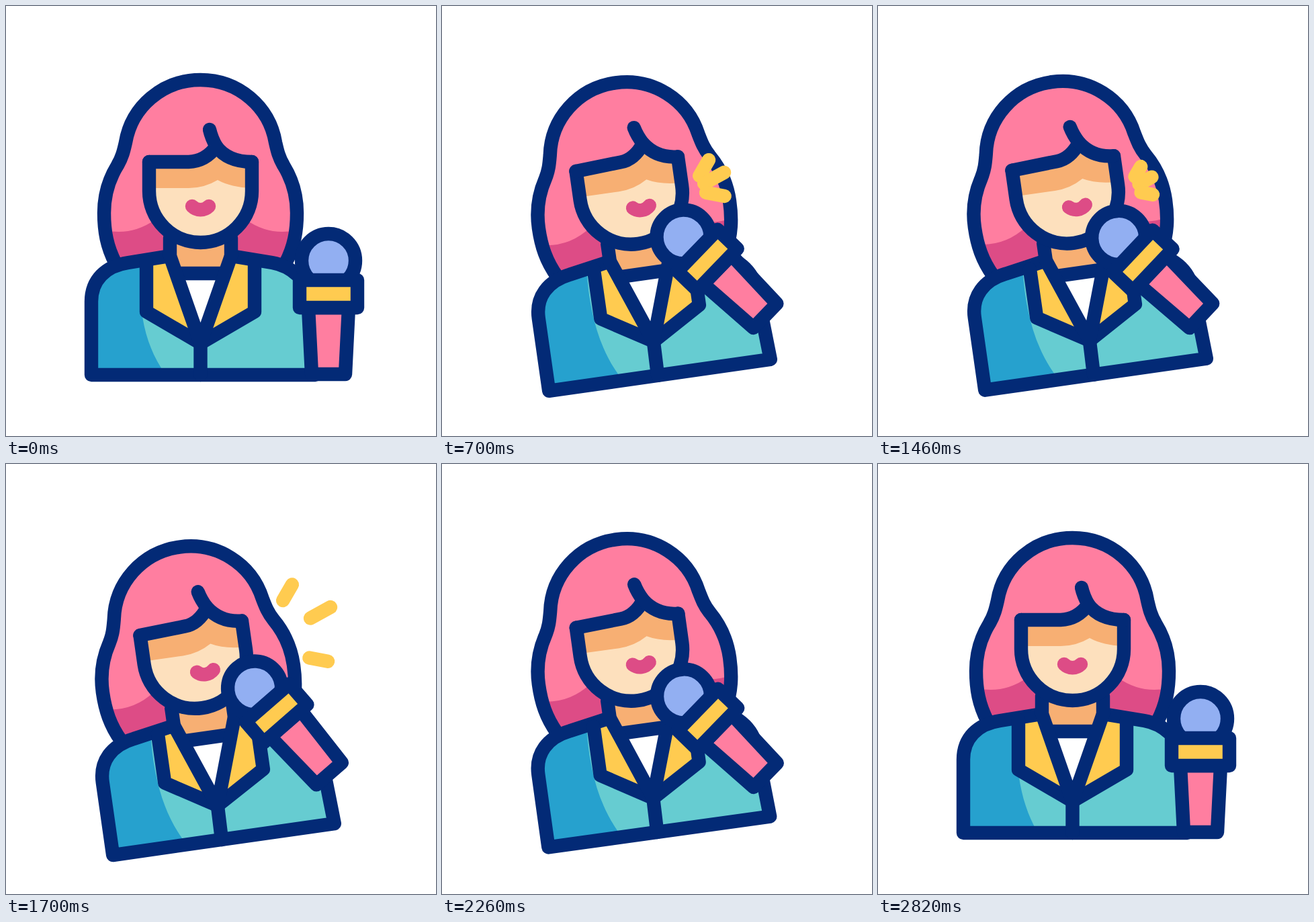
Animation, 640 px wide and 640 px high, one loop 3.02 s. Source, as an HTML page:

```html
<!DOCTYPE html>
<html lang="en">
<head>
<meta charset="utf-8">
<title>Singer</title>
<style>
  html, body { margin: 0; height: 100%; overflow: hidden; background: #fff; }
  svg { display: block; width: 100vw; height: 100vh; }
</style>
</head>
<body>
<svg id="stage" viewBox="0 0 640 640" fill="none" stroke-width="20.4" stroke-linecap="round" stroke-linejoin="round"></svg>
<script>
const LOOP = 3020, TALK = 600, BOB = 800, BACK = 2200, REST = 2810;
const NAVY = '#032a76', PINK = '#ff7ea0', ROSE = '#dd4c86', SKIN = '#fde0bd', TAN = '#f7af73',
      BLUE = '#26a1ce', TEAL = '#66ccd1', GOLD = '#ffcb50', LILAC = '#92aff2';

const stage = document.getElementById('stage');
const clamp = x => Math.min(1, Math.max(0, x));
const ease = x => (1 - Math.cos(Math.PI * clamp(x))) / 2;
const fill = (d, color) => `<path d="${d}" fill="${color}"/>`;
const line = (d, color = NAVY) => `<path d="${d}" stroke="${color}"/>`;
const lift = (dy, shapes) => `<g transform="translate(0 ${-dy})">${shapes}</g>`;

const HAIR = 'M163 383C150 358 146 335 146 308C146 280 153 258 166 237C173 225 175 216 178 203' +
  'C187 150 233 110 289.5 110C346 110 392 150 401 203C404 216 406 225 413 237' +
  'C426 258 433 280 433 308C433 335 429 358 416 383';
const LEFT_ARM = 'M127 549V440C127 408 148 387 182 382';
const RIGHT_ARM = 'L396 382C424 387 450 408 454 440L460 549';
const FACE = 'M213 232V275.5A76.5 76.5 0 0 0 366 275.5V232';

function hair() {
  return fill(HAIR + 'Z', PINK) +
    fill('M148 334Q188 342 222 318L244 350V375L165 386Z', ROSE) +
    fill('M431 334Q391 342 357 318L335 350V375L414 386Z', ROSE) +
    line(HAIR);
}

// p: how far the figure has turned, lag: delay of the sleeve shade
function jacket(p, lag) {
  const left = 209 + 9.5 * p, right = 370 - 3.5 * p;
  const neck = 372 - p, collar = 398 - 2 * p;
  const tip = `${289.5 + 2 * p} ${502 - 4 * p}`;
  const lapels = `M${left} ${381 - p}V${455 - 1.5 * p}L${tip}L${right} ${455 - p}V381`;
  return fill(`${LEFT_ARM}L244 ${neck}H335${RIGHT_ARM}Z`, TEAL) +
    fill(`${LEFT_ARM}L${208 - lag} 378C${203 - lag} 440 ${209 - lag} 500 238 549Z`, BLUE) +
    fill(`${lapels}L335 ${neck}H244Z`, GOLD) +
    fill(`M253 ${collar}H326L${tip}Z`, '#fff') +
    fill(`M244 340H335V${neck}L326 ${collar}H253L244 ${neck}Z`, TAN) +
    line(`M254 ${collar}H325`) +
    line(`${LEFT_ARM}L244 ${neck}M335 ${neck}${RIGHT_ARM}H127`) +
    line(lapels) +
    line(`M244 345V${neck}L${tip}L335 ${neck}V345M${tip}L${289.5 + p} 549`);
}

function face(p) {
  const dx = 4.5 * p, dy = -4 * p;
  const part = `${313 + dx} ${209 + dy}`;
  const bangs = `M213 232L${272 + 9 * p} ${232 + dy}Q${297 + dx} ${231 + dy} ${part}`;
  const sweep = `Q${330 + dx} ${232 + dy / 2} 366 232`;
  return fill(`${bangs}${sweep}V275.5A76.5 76.5 0 0 1 213 275.5Z`, SKIN) +
    fill(`${bangs}${sweep}V271Q335 270 315 259Q295 271 272 271H213Z`, TAN) +
    line(FACE) + line(bangs) +
    line(`M${303 + dx} ${184 + dy}Q${306 + dx} ${197 + dy} ${part}${sweep}`) +
    line(`M${277 + 12 * p} 298c7 7 18 7 25 0`, ROSE);
}

function mic(x, y, angle) {
  return `<g transform="translate(${x} ${y}) rotate(${-angle})" stroke="${NAVY}">
    <circle cy="-169" r="40" fill="${LILAC}"/>
    <path d="M-30 -99L-25 0H25L30 -99Z" fill="${PINK}"/>
    <path d="M-43 -140H43V-99H-43Z" fill="${GOLD}"/></g>`;
}

// Three dashes shoot outwards: start point, direction in degrees, reach
const RAYS = [[382.5, 254, -59.8, 92], [388.5, 265, -28.8, 115], [391.5, 277.5, 10.5, 95]];

function rays(t) {
  const head = clamp(t / 320), tail = clamp((t - 95) / 320);
  if (head <= tail) return '';
  return RAYS.map(([x, y, deg, reach]) => {
    const a = deg * Math.PI / 180;
    const at = k => `${x + Math.cos(a) * reach * k} ${y + Math.sin(a) * reach * k}`;
    return line(`M${at(tail)}L${at(head)}`, GOLD);
  }).join('');
}

function draw(t) {
  const p = t < BACK ? ease(t / TALK) : ease((REST - t) / (REST - BACK));
  const talking = t >= TALK && t < BACK;
  const beat = (t - TALK) % BOB;
  const bob = talking ? (1 - Math.cos(2 * Math.PI * beat / BOB)) / 2 : 0;
  const lag = t < TALK ? 7 * (1 - p) : 0;
  const x = 30.5 * p, y = -1.5 * p + 13 * bob;

  stage.innerHTML =
    `<g transform="translate(${x} ${y}) rotate(${-8.1 * p} 293.5 549)">` +
    lift(p, hair()) + jacket(p, lag) + lift(p, face(p)) + '</g>' +
    (talking ? rays(beat) : '') +
    mic(480 + p + 16 * p * (1 - p), 548 - 87 * p, 47 * p - 7 * bob);
}

let start;
function tick(now) {
  start ??= now;
  draw((now - start) % LOOP);
  requestAnimationFrame(tick);
}
draw(0);
requestAnimationFrame(tick);
</script>
</body>
</html>
```
